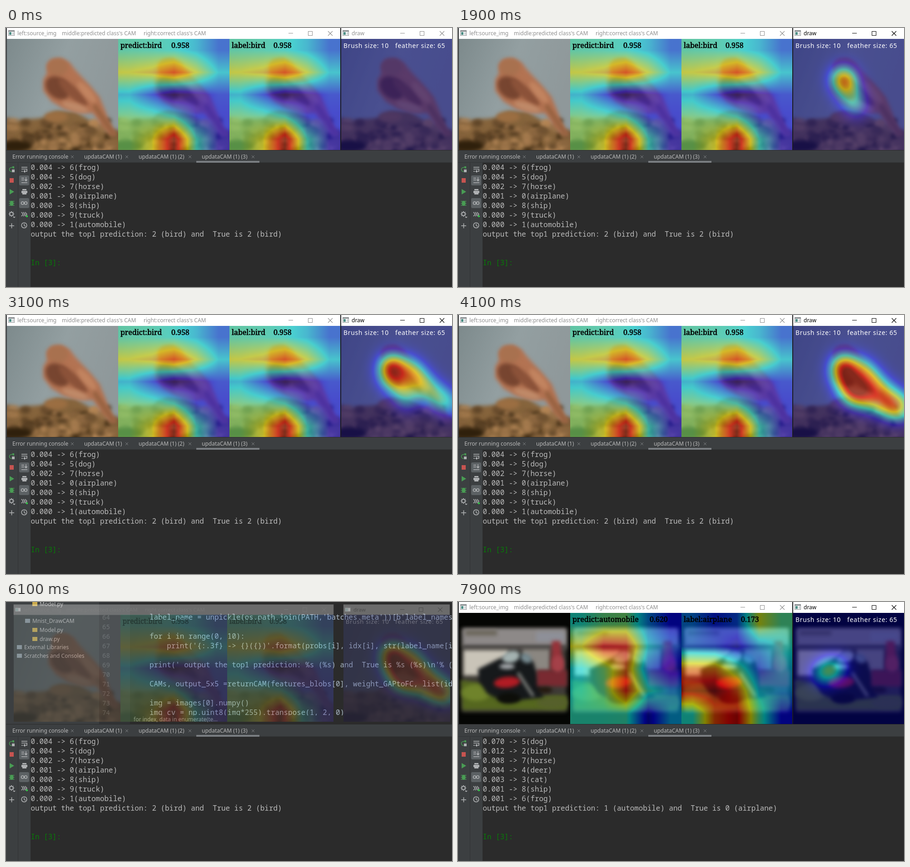
An HTML page with a canvas that plays this animation: 982x571 px, repeating every 8 s.

```html
<!DOCTYPE html>
<html lang="en">
<head>
<meta charset="utf-8">
<title>CAM drawing demo</title>
<style>
html, body { margin: 0; width: 100%; height: 100%; overflow: hidden; background: #2b2b2b; }
canvas { display: block; }
</style>
</head>
<body>
<canvas id="stage" width="982" height="571"></canvas>
<script>
const S = 245, LOOP = 8000, STEP = 100;
const UI = '"Noto Sans", sans-serif', MONO = '"Noto Sans Mono", monospace', SERIF = '"Noto Serif", serif';
const ctx = document.getElementById('stage').getContext('2d');
const clamp = (v, a = 0, b = 1) => Math.min(b, Math.max(a, v));

let seed = 7;
const rand = () => (seed = seed * 16807 % 2147483647) / 2147483647;

function surface(w, h) {
  const c = document.createElement('canvas');
  c.width = w; c.height = h;
  return c.getContext('2d');
}
function rect(g, x, y, w, h, color) { g.fillStyle = color; g.fillRect(x, y, w, h); }
function poly(g, color, ...p) {
  g.fillStyle = color;
  g.beginPath();
  for (let i = 0; i < p.length; i += 2) g.lineTo(p[i], p[i + 1]);
  g.fill();
}
function oval(g, color, x, y, rx, ry = rx, turn = 0) {
  g.fillStyle = color;
  g.beginPath();
  g.ellipse(x, y, rx, ry, turn, 0, 7);
  g.fill();
}
function line(g, color, width, ...p) {
  g.strokeStyle = color; g.lineWidth = width;
  g.beginPath();
  for (let i = 0; i < p.length; i += 2) g.lineTo(p[i], p[i + 1]);
  g.stroke();
}
function text(g, str, x, y, color, font) {
  g.fillStyle = color; g.font = font;
  g.fillText(str, x, y);
}

// Blurred stand-in photographs, 245 px square
function birdPhoto() {
  const g = surface(S, S);
  const sky = g.createLinearGradient(0, 0, S, 90);
  sky.addColorStop(0, '#7d8a8c'); sky.addColorStop(.5, '#939fa1'); sky.addColorStop(1, '#8f989a');
  rect(g, 0, 0, S, S, sky);
  g.filter = 'blur(4px)';
  poly(g, '#86643c', -20, 186, 35, 178, 80, 174, 108, 160, 150, 160, 180, 178, 205, 196, 265, 220, 265, 270, -20, 270);
  for (let i = 0; i < 90; i++) {
    const x = rand() * 240, y = 180 + rand() * 70, k = rand() * clamp(1.4 - (y - 180) / 90 + x / 500);
    oval(g, `rgb(${60 + 130 * k},${42 + 100 * k},${20 + 72 * k})`, x, y, 6 + rand() * 8, 5 + rand() * 6);
  }
  oval(g, '#2f200c', 20, 236, 34, 13);
  oval(g, '#9b6e42', 108, 172, 26, 12);
  poly(g, '#b37352', 88, 56, 98, 45, 120, 43, 138, 52, 152, 70, 182, 102, 204, 128, 214, 152, 226, 184, 242, 214,
    226, 210, 205, 186, 190, 164, 160, 163, 125, 154, 98, 138, 80, 114, 80, 90, 88, 76);
  oval(g, '#a8714f', 112, 62, 23, 19);
  oval(g, '#774530', 112, 108, 30, 22, .7);
  oval(g, '#8b5239', 146, 118, 42, 12, .75);
  oval(g, '#c28460', 176, 118, 30, 9, .85);
  oval(g, '#bf8a69', 150, 150, 30, 8, .3);
  line(g, '#93603f', 10, 192, 146, 236, 212);
  return g;
}
function planePhoto() {
  const g = surface(S, S);
  rect(g, 0, 0, S, S, '#050604');
  g.filter = 'blur(4.5px)';
  rect(g, 6, 34, 231, 185, '#3e3b36');
  rect(g, 8, 34, 229, 40, '#8d8988');
  rect(g, 14, 38, 70, 12, '#6c675c');
  rect(g, 170, 42, 62, 22, '#8e9098');
  rect(g, 8, 72, 229, 10, '#4b4846');
  rect(g, 10, 82, 98, 56, '#c9c4b8');
  rect(g, 140, 80, 60, 48, '#8b8781');
  poly(g, '#55671f', 4, 148, 60, 156, 110, 185, 238, 182, 238, 214, 8, 214);
  oval(g, '#6f832b', 38, 176, 32, 18);
  oval(g, '#56602b', 205, 198, 34, 13);
  poly(g, '#16191b', 42, 124, 86, 102, 130, 88, 164, 108, 176, 150, 186, 186, 100, 196, 62, 178, 44, 150);
  oval(g, '#a4b2b1', 115, 97, 20, 13, -.3);
  oval(g, '#75898f', 148, 100, 13, 10, .6);
  oval(g, '#a9adb0', 106, 118, 17, 6);
  oval(g, '#b01c24', 106, 153, 29, 12, -.1);
  line(g, '#9fa29b', 5, 130, 132, 164, 184);
  poly(g, '#96333a', 205, 62, 223, 62, 231, 128, 202, 128);
  rect(g, 172, 126, 66, 36, '#792a31');
  oval(g, '#a44149', 218, 112, 13, 18);
  oval(g, '#23180e', 190, 170, 16, 7);
  oval(g, '#0d0e09', 110, 188, 26, 12);
  return g;
}

// Half photograph, half jet colour map of field(x, y)
const band = (v, mid) => 127.5 * clamp(1.5 - Math.abs(4 * v - mid));
function heat(photo, field) {
  const img = photo.getImageData(0, 0, S, S), d = img.data;
  for (let i = 0, y = 0; y < S; y++) for (let x = 0; x < S; x++, i += 4) {
    const v = clamp(field(x, y));
    d[i] = d[i] / 2 + band(v, 3);
    d[i + 1] = d[i + 1] / 2 + band(v, 2);
    d[i + 2] = d[i + 2] / 2 + band(v, 1);
  }
  const g = surface(S, S);
  g.putImageData(img, 0, 0);
  return g.canvas;
}
// 5x5 class activation map, in percent, with bilinear upsampling
const cam = (...m) => (x, y) => {
  const u = clamp(x / 49 - .5, 0, 4), v = clamp(y / 49 - .5, 0, 4);
  const c = Math.min(3, u | 0), r = Math.min(3, v | 0), i = r * 5 + c, a = u - c, b = v - r;
  return ((m[i] * (1 - a) + m[i + 1] * a) * (1 - b) + (m[i + 5] * (1 - a) + m[i + 6] * a) * b) / 100;
};

const birdImg = birdPhoto(), planeImg = planePhoto();
const birdCam = heat(birdImg, cam(
  44, 43, 40, 33, 20,
  63, 68, 82, 62, 36,
  33, 16, 0, 8, 15,
  50, 47, 38, 13, 12,
  50, 60, 100, 38, 13));
const scenes = [
  {
    photo: birdImg, cams: [birdCam, birdCam],
    labels: [['predict:bird', 252], ['0.958', 364], ['label:bird', 497], ['0.958', 589]],
    log: ['0.004 -> 6(frog)', '0.004 -> 5(dog)', '0.002 -> 7(horse)', '0.001 -> 0(airplane)', '0.000 -> 8(ship)',
      '0.000 -> 9(truck)', '0.000 -> 1(automobile)', 'output the top1 prediction: 2 (bird) and  True is 2 (bird)'],
    // start, steps, strength, path
    strokes: [
      [1200, 3, .55, [846, 104, 851, 120]],
      [1500, 6, .7, [848, 118, 888, 195]],
      [2100, 5, .75, [878, 108, 918, 155]],
      [2600, 4, .72, [918, 155, 985, 203]],
      [3000, 3, .35, [835, 132, 870, 160]],
      [3300, 6, 1.25, [870, 160, 940, 200, 985, 215]],
      [3900, 3, .15, [856, 170, 860, 178]]]
  },
  {
    photo: planeImg,
    cams: [
      heat(planeImg, cam(
        40, 48, 50, 26, 12,
        62, 90, 87, 36, 20,
        37, 51, 78, 22, 8,
        38, 48, 86, 42, 27,
        42, 42, 43, 7, 30)),
      heat(planeImg, cam(
        25, 15, 20, 60, 46,
        22, 18, 7, 28, 40,
        75, 75, 50, 18, 32,
        95, 100, 80, 34, 28,
        40, 80, 92, 45, 12))],
    labels: [['predict:automobile', 252], ['0.620', 422], ['label:airplane', 497], ['0.173', 623]],
    log: ['0.070 -> 5(dog)', '0.012 -> 2(bird)', '0.008 -> 7(horse)', '0.004 -> 4(deer)', '0.003 -> 3(cat)',
      '0.001 -> 8(ship)', '0.001 -> 6(frog)', 'output the top1 prediction: 1 (automobile) and  True is 0 (airplane)'],
    strokes: [[7400, 6, .6, [793, 160, 815, 151, 840, 142]]]
  }
];

function along(p, f) {
  const len = [];
  for (let i = 2; i < p.length; i += 2) len.push(Math.hypot(p[i] - p[i - 2], p[i + 1] - p[i - 1]));
  let d = f * len.reduce((a, b) => a + b), k = 0;
  while (k < len.length - 1 && d > len[k]) d -= len[k++];
  const q = d / len[k], i = 2 * k;
  return [p[i] + (p[i + 2] - p[i]) * q, p[i + 1] + (p[i + 3] - p[i + 1]) * q];
}
// Sum of soft round brush stamps laid down until time t
function paintField(strokes, t) {
  const sum = new Float32Array(S * S), N = 18;
  const bell = c => Float32Array.from({ length: S }, (_, i) => Math.exp(-((i - c) ** 2) / 882));
  for (const [start, steps, power, path] of strokes) {
    const done = N * clamp((Math.floor((t - start) / STEP) + 1) / steps);
    for (let k = 0; k < done; k++) {
      const [px, py] = along(path, (k + .5) / N), bx = bell(px - 738), by = bell(py - 24);
      for (let y = 0; y < S; y++) {
        const w = by[y] * power / N;
        for (let x = 0; x < S; x++) sum[y * S + x] += w * bx[x];
      }
    }
  }
  return (x, y) => sum[y * S + x];
}

function titleBar(x, w, title, ink) {
  rect(ctx, x, 0, w, 24, '#fff');
  rect(ctx, x + 3, 5, 14, 12, '#85898c');
  rect(ctx, x + 4, 8, 12, 8, '#fff');
  rect(ctx, x + 5, 9, 5, 6, '#4f8f86');
  rect(ctx, x + 12, 9, 3, 6, '#c9cdd0');
  for (const [str, tx] of title) text(ctx, str, tx, 16, ink, '12px ' + UI);
  const r = x > 700 ? 960 : 714;
  line(ctx, ink, 1, r - 92, 11.5, r - 82, 11.5);
  ctx.strokeRect(r - 48.5, 7.5, 9, 9);
  line(ctx, ink, 1.1, r - 5, 7, r + 5, 17);
  line(ctx, ink, 1.1, r + 5, 7, r - 5, 17);
}
function scaled(cx, k, draw) {
  ctx.save();
  ctx.translate(cx, 135); ctx.scale(k, k); ctx.translate(-cx, -135);
  draw();
  ctx.restore();
}
function windows(scene, t, alpha, k) {
  ctx.save();
  ctx.globalAlpha = alpha;
  scaled(369, k, () => {
    titleBar(2, 734, [['left:source_img', 25], ["middle:predicted class's CAM", 123], ["right:correct class's CAM", 303]], '#8f8f8f');
    ctx.drawImage(scene.photo.canvas, 2, 24);
    scene.cams.forEach((c, i) => ctx.drawImage(c, 247 + i * 244.5, 24, 244.5, S));
    for (const [str, x] of scene.labels) {
      text(ctx, str, x, 44, '#000', '16px ' + SERIF);
      ctx.lineWidth = .6; ctx.strokeStyle = '#000';
      ctx.strokeText(str, x, 44);
    }
  });
  scaled(860, k, () => {
    titleBar(738, 244, [['draw', 761]], t < 1200 ? '#8f8f8f' : '#000');
    ctx.drawImage(heat(scene.photo, paintField(scene.strokes, t)), 738, 24);
    ctx.letterSpacing = '0.65px';
    text(ctx, 'Brush size: 10', 743, 44, '#fff', '14px ' + UI);
    text(ctx, 'feather size: 65', 857, 44, '#fff', '14px ' + UI);
    ctx.letterSpacing = '0px';
  });
  ctx.restore();
}

function editor() {
  rect(ctx, 0, 0, 982, 270, '#2b2b2b');
  rect(ctx, 0, 0, 205, 270, '#3c3f41');
  rect(ctx, 205, 0, 68, 270, '#313335');
  const tree = [['Model.py', 74, 9], ['Mnist_DrawCAM', 58, 46], ['Model.py', 74, 66], ['draw.py', 74, 86],
    ['External Libraries', 40, 104], ['Scratches and Consoles', 40, 123]];
  for (const [str, x, y] of tree) {
    text(ctx, str, x, y, '#bbb', '12px ' + UI);
    rect(ctx, x - 16, y - 9, 11, 9, x > 60 ? '#c9a94a' : '#8b979f');
  }
  for (let n = 0; n < 11; n++) text(ctx, 64 + n, 212, 39 + 21 * n, '#606366', '14px ' + MONO);
  const code = ["label_name = unpickle(os.path.join(PATH,'batches.meta'))[b'label_names']", '', 'for i in range(0, 10):',
    "    print('{:.3f} -> {}({})'.format(probs[i], idx[i], str(label_name[idx[i]])))", '',
    "print(' output the top1 prediction: %s (%s) and  True is %s (%s)\\n'% (idx[0],", '',
    'CAMs, output_5x5 =returnCAM(features_blobs[0], weight_GAPtoFC, list(idx))', '',
    'img = images[0].numpy()', 'img_cv = np.uint8(img*255).transpose(1, 2, 0)'];
  code.forEach((str, i) => text(ctx, str, 316, 39 + 21 * i, '#a9b7c6', '15.9px ' + MONO));
  rect(ctx, 273, 250, 709, 18, '#2b2b2b');
  text(ctx, 'for index, data in enumerate(te...', 281, 263, '#a0a0a0', '12px ' + UI);
}

function toolbar() {
  const green = '#499c54', gray = '#afb1b3';
  const ring = (color, x, y, r, a = 0, b = 7) => {
    ctx.strokeStyle = color; ctx.lineWidth = 1.6;
    ctx.beginPath(); ctx.arc(x, y, r, a, b); ctx.stroke();
  };
  rect(ctx, 0, 297, 54, 274, '#3c3f41');
  rect(ctx, 26, 297, 1, 274, '#313335');
  for (const y of [325, 375]) {
    ctx.fillStyle = '#5c6164';
    ctx.beginPath(); ctx.roundRect(29, y, 22, 22, 3); ctx.fill();
  }
  ring(green, 12, 312, 4.5, 1.5, 5.6);
  poly(ctx, green, 13, 305, 18, 305, 18, 311);
  rect(ctx, 13, 312, 6, 6, gray);
  rect(ctx, 8, 331, 9, 10, '#c75450');
  poly(ctx, green, 8, 355, 18, 361, 8, 367);
  oval(ctx, green, 12.5, 386.5, 4, 5.5);
  for (const y of [382, 386.5, 391]) line(ctx, green, 1.3, 6.5, y, 18.5, y);
  ring(gray, 12, 410, 3.6);
  for (let a = 0; a < 6.2; a += Math.PI / 4)
    line(ctx, gray, 2, 12 + 4 * Math.cos(a), 410 + 4 * Math.sin(a), 12 + 6 * Math.cos(a), 410 + 6 * Math.sin(a));
  poly(ctx, gray, 15, 416, 21, 416, 18, 419);
  line(ctx, gray, 1.6, 7, 436, 18, 436);
  line(ctx, gray, 1.6, 12.5, 430.5, 12.5, 441.5);

  line(ctx, gray, 1.6, 34, 307, 47, 307);
  line(ctx, gray, 1.6, 34, 311, 46, 311, 46, 316, 41, 316);
  poly(ctx, gray, 42, 312.5, 38, 316, 42, 319.5);
  line(ctx, gray, 1.6, 34, 316, 37, 316);
  for (const y of [331, 335]) line(ctx, gray, 1.5, 34, y, 40, y);
  line(ctx, gray, 1.5, 34, 341, 47, 341);
  line(ctx, gray, 1.5, 44, 329, 44, 335);
  poly(ctx, gray, 40.5, 334, 47.5, 334, 44, 338.5);
  rect(ctx, 36, 355, 9, 3, gray);
  rect(ctx, 34, 359, 13, 5, gray);
  rect(ctx, 36, 363, 9, 4, gray);
  ring(gray, 36.5, 386, 3); ring(gray, 43.5, 386, 3);
  for (const x of [34, 38, 42]) line(ctx, gray, 1.6, x, 406, x + 4, 410.5, x, 415);
  oval(ctx, '#35c24a', 46, 415, 2.3);
  ring(gray, 40, 435, 5.8);
  line(ctx, gray, 1.4, 40, 431, 40, 435.5, 43, 437);
}

function console_(scene) {
  rect(ctx, 0, 269, 982, 302, '#2b2b2b');
  rect(ctx, 0, 270, 982, 27, '#3c3f41');
  rect(ctx, 0, 296, 982, 1, '#323537');
  rect(ctx, 419, 293, 139, 4, '#7a7e82');
  const tabs = [['Error running console', 14, 146], ['updataCAM (1)', 172, 266],
    ['updataCAM (1) (2)', 292, 405], ['updataCAM (1) (3)', 431, 544]];
  for (const [str, x, cx] of tabs) {
    text(ctx, str, x, 288, '#bbb', '12px ' + UI);
    line(ctx, '#7b7e80', 1, cx - 3, 281, cx + 3, 287);
    line(ctx, '#7b7e80', 1, cx + 3, 281, cx - 3, 287);
  }
  toolbar();
  scene.log.forEach((str, i) => text(ctx, str, 54.5, 313 + 21 * i, '#bbb', '15.9px ' + MONO));
  text(ctx, 'In [3]:', 54.5, 523, '#087a08', '15.9px ' + MONO);
}

// Opacity and scale while the windows close and open again
const fade = { 6000: [.76, .99], 6100: [.3, .96], 6200: [.6, .98] };
function draw(t) {
  const scene = scenes[t < 6200 ? 0 : 1], [alpha, k] = fade[t] || [1, 1];
  editor();
  if (alpha === 1) rect(ctx, 736, 0, 2, 270, '#1b1b1d');
  windows(scene, t, alpha, k);
  console_(scene);
}

let shown = -1;
function tick() {
  const t = Math.floor(performance.now() % LOOP / STEP) * STEP;
  if (t !== shown) draw(shown = t);
  requestAnimationFrame(tick);
}
tick();
</script>
</body>
</html>
```
